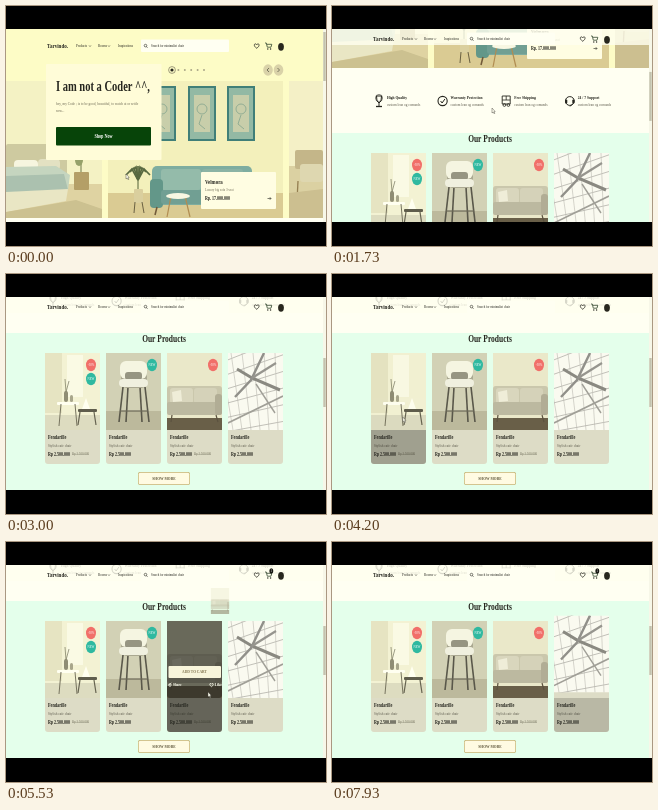
Write an HTML page with a canvas that moves like this. It is 320 px wide and 240 px high and loops after 8000 ms.

```html
<!DOCTYPE html>
<html lang="en">
<head>
<meta charset="utf-8">
<title>Furniture shop</title>
<style>
html, body { margin: 0; width: 100%; height: 100%; overflow: hidden; background: #000; }
canvas { display: block; width: 320px; height: 240px; }
</style>
</head>
<body>
<canvas id="stage"></canvas>
<script>
const LOOP = 8000;
const SQUEEZE = 0.72;
const TOP = 23, BOTTOM = 216;
const INK = '#26261f', PAPER = '#fffff2', GREEN = '#074409';
const TEAL = '#2fb9a0', RED = '#f16f69';

const canvas = document.getElementById('stage');
const ctx = canvas.getContext('2d');
const dpr = window.devicePixelRatio || 1;
canvas.width = 320 * dpr;
canvas.height = 240 * dpr;

const clamp = v => Math.max(0, Math.min(1, v));
const smooth = v => { v = clamp(v); return v * v * (3 - 2 * v); };

// Keys are [time, ...values]; values ease from key to key.
function track(keys, t) {
  if (t <= keys[0][0]) return keys[0].slice(1);
  for (let i = 1; i < keys.length; i++) {
    const a = keys[i - 1], b = keys[i];
    if (t < b[0]) {
      const k = smooth((t - a[0]) / (b[0] - a[0]));
      return a.slice(1).map((v, j) => v + (b[j + 1] - v) * k);
    }
  }
  return keys[keys.length - 1].slice(1);
}

function rect(x, y, w, h, fill, r = 0) {
  ctx.fillStyle = fill;
  ctx.beginPath();
  ctx.roundRect(x, y, w, h, r);
  ctx.fill();
}

function disc(x, y, rx, fill, ry = rx) {
  ctx.fillStyle = fill;
  ctx.beginPath();
  ctx.ellipse(x, y, rx, ry, 0, 0, 7);
  ctx.fill();
}

function ring(x, y, r, color, width = 0.8) {
  ctx.strokeStyle = color;
  ctx.lineWidth = width;
  ctx.beginPath();
  ctx.arc(x, y, r, 0, 7);
  ctx.stroke();
}

function line(points, color, width = 0.8) {
  ctx.strokeStyle = color;
  ctx.lineWidth = width;
  ctx.beginPath();
  points.forEach(([x, y]) => ctx.lineTo(x, y));
  ctx.stroke();
}

function poly(points, fill) {
  ctx.fillStyle = fill;
  ctx.beginPath();
  points.forEach(([x, y]) => ctx.lineTo(x, y));
  ctx.fill();
}

function text(str, x, y, size, { color = INK, bold = false, align = 'left' } = {}) {
  ctx.save();
  ctx.translate(x, y);
  ctx.scale(SQUEEZE, 1);
  ctx.font = `${bold ? 'bold ' : ''}${size}px "Liberation Serif", serif`;
  ctx.textAlign = align;
  ctx.textBaseline = 'middle';
  ctx.fillStyle = color;
  ctx.fillText(str, 0, 0);
  ctx.restore();
}

function faded(alpha, draw) {
  if (alpha <= 0) return;
  ctx.save();
  ctx.globalAlpha *= alpha;
  draw();
  ctx.restore();
}

function clipped(x, y, w, h, draw) {
  ctx.save();
  ctx.beginPath();
  ctx.rect(x, y, w, h);
  ctx.clip();
  draw();
  ctx.restore();
}

function bedSlide() {
  rect(0, 75, 96, 137, '#f4f2c4');
  rect(0, 178, 96, 34, '#dfd3a2');
  rect(0, 138, 61, 34, '#cecaa0', 2);
  rect(8, 154, 24, 10, '#f6f5df', 4);
  rect(32, 153, 22, 11, '#e3e1c2', 4);
  poly([[0, 161], [50, 160], [64, 169], [62, 184], [0, 188]], '#c5d5bf');
  poly([[0, 170], [58, 168], [62, 184], [0, 188]], '#abc1af');
  poly([[0, 186], [62, 183], [60, 195], [0, 206]], '#e9e6c4');
  poly([[0, 206], [70, 194], [96, 203], [96, 212], [0, 212]], '#ccc190');
  rect(68, 166, 15, 18, '#b49f67', 1);
  line([[75, 166], [75, 152]], '#6d7649', 1);
  disc(73, 154, 4, '#95a169', 6);
}

function roomSlide() {
  rect(102, 75, 175, 137, '#f3f0bb');
  rect(102, 187, 175, 25, '#dacb93');
  for (const x of [142, 182, 221]) {
    rect(x, 80, 28, 55, '#407f78');
    rect(x + 2, 82, 24, 51, '#93b9a4');
    rect(x + 6, 89, 16, 37, '#c8ceaa');
    ring(x + 14, 103, 5, '#84a58e');
    line([[x + 14, 109], [x + 11, 118], [x + 17, 123]], '#84a58e');
  }
  rect(146, 160, 100, 39, '#7eada0', 5);
  rect(155, 163, 40, 21, '#94bbaa', 3);
  rect(196, 163, 41, 21, '#8bb3a4', 3);
  rect(144, 173, 13, 29, '#639789', 4);
  rect(155, 184, 84, 14, '#719f93', 3);
  line([[151, 201], [149, 209]], '#715a39', 1.5);
  line([[165, 190], [161, 211]], '#b08c51', 1.2);
  line([[179, 190], [184, 211]], '#b08c51', 1.2);
  disc(172, 190, 12, '#f8f7e2', 3);
  line([[132, 187], [132, 166]], '#526137', 1);
  for (let i = -3; i <= 3; i++) {
    line([[132, 174], [132 + i * 2, 163 - (3 - Math.abs(i))], [132 + i * 4, 160 + Math.abs(i) * 3]], '#586940', 1.7);
  }
  rect(128, 183, 9, 14, '#dacf9e', 1);
  line([[129, 196], [128, 207]], '#4d442c');
  line([[136, 196], [138, 207]], '#4d442c');
}

function sideSlide() {
  rect(283, 75, 34, 137, '#f4f0c6');
  rect(283, 160, 34, 52, '#dbd1a2');
  rect(289, 144, 28, 19, '#c4b689', 2);
  rect(294, 158, 23, 18, '#ded7b0', 3);
  line([[292, 175], [291, 195]], '#947e50', 1.3);
  poly([[283, 187], [317, 183], [317, 212], [283, 212]], '#ccbf90');
}

function hero() {
  rect(0, 0, 320, 214, '#fdfcc6');
  bedSlide();
  roomSlide();
  sideSlide();
  for (let i = 0; i < 6; i++) disc(166 + i * 6.4, 64, i ? 1 : 1.6, i ? '#aaa687' : INK);
  ring(166, 64, 3.4, '#77735c', 0.7);
  for (const [x, d] of [[262, 1], [272.5, -1]]) {
    disc(x, 64, 4.8, '#d9d2a8', 5.8);
    line([[x + d, 62], [x - d, 64], [x + d, 66]], '#605d49');
  }
  rect(40, 58, 115.5, 96, '#fffcd8', 1);
  text('I am not a Coder ^^,', 50, 81, 14.6, { bold: true });
  text('hey, my Code ; is to be good, beautiful, to watch at or settle', 50, 98, 4.8, { color: '#6b6853' });
  text('now...', 50, 105, 4.8, { color: '#6b6853' });
  rect(50, 121, 95, 18.5, GREEN, 1);
  text('Shop Now', 97.5, 130.5, 5.8, { color: '#fff', bold: true, align: 'center' });
  rect(195, 166, 75, 37, '#fffde2', 1);
  text('Velmora', 199, 176, 6.8, { bold: true });
  text('Luxury big sofa 3-seat', 199, 184, 4.4, { color: '#74715b' });
  text('Rp. 17.000.000', 199, 193, 5.5, { bold: true });
  line([[261.5, 192.5], [265, 192.5]], INK, 0.6);
  line([[263.8, 191.2], [265, 192.5], [263.8, 193.8]], INK, 0.6);
}

function featureIcon(kind, x, y) {
  if (kind === 0) {
    line([[x - 2.5, y - 5], [x + 2.5, y - 5], [x + 2, y], [x, y + 2], [x - 2, y], [x - 2.5, y - 5]], INK, 1);
    line([[x, y + 2], [x, y + 5]], INK, 1);
    line([[x - 3, y + 5.5], [x + 3, y + 5.5]], INK, 1.3);
    ring(x, y - 3, 3.5, INK, 0.6);
  } else if (kind === 1) {
    ring(x, y, 4.6, INK, 1.1);
    line([[x - 2, y], [x - 0.5, y + 2], [x + 2.3, y - 2]], INK, 1);
  } else if (kind === 2) {
    line([[x - 4, y - 5], [x + 4, y - 5], [x + 4, y + 3], [x - 4, y + 3], [x - 4, y - 5]], INK, 0.9);
    line([[x - 4, y - 1], [x + 4, y - 1]], INK);
    line([[x, y - 5], [x, y - 1]], INK);
    ring(x - 1.8, y + 4, 1.4, INK);
    ring(x + 2.2, y + 4, 1.4, INK);
  } else {
    ring(x, y, 4.4, INK, 1);
    rect(x - 4.7, y - 1.5, 2.2, 4, INK, 1);
    rect(x + 2.5, y - 1.5, 2.2, 4, INK, 1);
    line([[x + 3, y + 3], [x, y + 5.3]], INK, 1);
  }
}

function features() {
  rect(0, 212, 320, 65, PAPER);
  ['High Quality', 'Warranty Protection', 'Free Shipping', '24 / 7 Support'].forEach((title, i) => {
    const x = 47 + i * 63.6;
    featureIcon(i, x, 245);
    text(title, x + 8, 241.5, 5, { bold: true });
    text('custom lean og comands', x + 8, 248.5, 4.7, { color: '#5b584a' });
  });
}

// Product pictures are drawn in a 55 by 77 box.
const pictures = [
  () => {
    rect(0, 0, 55, 77, '#f3f2d3');
    rect(0, 0, 17, 60, '#e6e4c2');
    rect(22, 2, 16, 42, '#fafae4');
    rect(0, 62, 55, 15, '#dddcc0');
    rect(12, 49, 22, 3, '#fffff0', 1);
    line([[16, 51], [14, 73]], '#77745f', 1);
    line([[30, 51], [32, 73]], '#77745f', 1);
    rect(19, 38, 4, 11, '#8f8d74', 2);
    rect(25, 42, 3, 7, '#a8a68b', 1.5);
    line([[21, 39], [20, 26]], '#85846b');
    line([[21, 39], [24, 28]], '#85846b');
    poly([[41, 45], [45, 56], [37, 56]], '#fffff0');
    rect(33, 56, 19, 3, '#5f5d4c', 1);
    line([[35, 59], [33, 72]], '#65624f', 1.2);
    line([[49, 59], [51, 72]], '#65624f', 1.2);
  },
  () => {
    rect(0, 0, 55, 77, '#d2d1b5');
    rect(0, 58, 55, 19, '#bcb99c');
    for (const [a, b] of [[17, 13], [22, 20], [34, 36], [39, 43]]) line([[a, 34], [b, 69]], '#59574a', 1.6);
    line([[14, 58], [42, 58]], '#6b6858', 1.2);
    rect(15, 10, 26, 25, '#aaa891', 6);
    rect(14, 8, 27, 18, '#f5f5e1', 6);
    rect(19, 19, 17, 8, '#969582', 3);
    rect(13, 26, 29, 8, '#f0f0df', 4);
  },
  () => {
    rect(0, 0, 55, 77, '#eae8c9');
    rect(0, 65, 55, 12, '#695f48');
    rect(0, 33, 55, 22, '#cac7ac', 3);
    rect(3, 35, 23, 16, '#d9d6bd', 3);
    rect(27, 35, 23, 16, '#d5d2b9', 3);
    rect(0, 49, 55, 13, '#bcb9a0', 2);
    rect(48, 41, 7, 21, '#b1ad95', 3);
    poly([[5, 39], [14, 37], [15, 48], [6, 49]], '#efedd8');
    line([[5, 62], [4, 69]], '#5c5340', 1.2);
    line([[49, 62], [51, 69]], '#5c5340', 1.2);
  },
  () => {
    rect(0, 0, 55, 77, '#fafaf0');
    for (let i = 0; i < 7; i++) {
      line([[-8, 10 + i * 14], [63, -18 + i * 17]], '#b3b2aa', 0.8);
      line([[i * 11 - 8, 0], [i * 9 + 5, 77]], '#c4c3ba', 0.7);
    }
    line([[9, 16], [24, 25], [52, 37]], '#8a8981', 3);
    line([[36, 0], [23, 27], [7, 44]], '#91908a', 2.4);
    line([[24, 25], [48, 10]], '#96958e', 2.2);
    line([[0, 70], [55, 43]], '#a09f97', 1.6);
    line([[28, 31], [47, 60]], '#a09f97', 1.4);
  }
];

const cards = [
  { badges: [['-30%', RED], ['NEW', TEAL]], old: true, hover: [4050, 4450] },
  { badges: [['NEW', TEAL]], hover: [4450, 4700] },
  { badges: [['-30%', RED]], old: true, hover: [4700, 6250] },
  { badges: [], hover: [6300, 7740] }
];
cards.forEach((card, i) => { card.x = 39 + i * 61; });

const FADE = 300;
const hoverAmount = ([enter, leave], t) =>
  smooth((t - enter) / FADE) * (1 - smooth((t - leave) / FADE));
const lift = ([, leave], t) => 6 * Math.sin(Math.PI * clamp((t - leave) / FADE));

function picture(i, x, y) {
  clipped(x, y, 55, 77, () => {
    ctx.translate(x, y);
    pictures[i]();
  });
}

const shade = (x, y, h, alpha) => faded(alpha * 0.65, () => rect(x, y, 55, h, '#26261f', [0, 0, 3, 3]));

function cardActions(x, alpha, onButton) {
  faded(alpha, () => {
    rect(x + 1.5, 342, 52.5, 12, onButton ? '#54855a' : '#f8f5db', 1);
    text('ADD TO CART', x + 27.5, 348, 5, {
      color: onButton ? '#a5c68b' : '#827550', bold: true, align: 'center'
    });
    const white = { color: '#fffff0', bold: true };
    ring(x + 3, 361, 1.3, '#fffff0', 0.7);
    line([[x + 2, 361], [x + 4.5, 359]], '#fffff0', 0.7);
    text('Share', x + 6, 361, 4.8, white);
    heart(x + 44.5, 361, 0.55, '#fffff0');
    text('Like', x + 48, 361, 4.8, white);
  });
}

// The shade reaches the body first and the picture in the second half of the fade.
function product(card, i, t, [px, py]) {
  const x = card.x;
  const h = hoverAmount(card.hover, t);
  const full = clamp(2 * h - 1);
  rect(x, 297, 55, 111, '#dddcc6', 3);
  text('Fendarille', x + 3, 381.5, 5.8, { bold: true });
  text('Stylish cafe chair', x + 3, 390, 4.7, { color: '#605e50' });
  text('Rp 2.500.000', x + 3, 398.5, 5.5, { bold: true });
  if (card.old) {
    text('Rp 3.500.000', x + 27, 398.2, 4.4, { color: '#85836f' });
    line([[x + 27, 398.3], [x + 44, 398.3]], '#85836f', 0.4);
  }
  shade(x, 374, 34, h);
  picture(i, x, 297 - lift(card.hover, t));
  faded(1 - clamp(h * 4), () => card.badges.forEach(([label, color], n) => {
    disc(x + 46, 309 + n * 14, 5, color, 6.2);
    text(label, x + 46, 309.2 + n * 14, 4.2, { color: '#fff', align: 'center' });
  }));
  shade(x, 297, 77, full);
  const onButton = px > x && px < x + 55 && py > 124 && py < 136;
  cardActions(x, full, onButton);
}

function products(t, pointer) {
  rect(0, 277, 320, 220, '#e4ffeb');
  text('Our Products', 158, 283.5, 10.4, { bold: true, align: 'center' });
  cards.forEach((card, i) => product(card, i, t, pointer));
  rect(132, 416, 52, 13, '#c4b272', 2);
  rect(132.7, 416.7, 50.6, 11.6, '#fffbe2', 1.5);
  text('SHOW MORE', 158, 422.5, 5, { bold: true, color: '#625a3e', align: 'center' });
}

function heart(x, y, s, color) {
  ctx.strokeStyle = color;
  ctx.lineWidth = 0.8;
  ctx.beginPath();
  ctx.moveTo(x, y + 3 * s);
  ctx.bezierCurveTo(x - 6 * s, y - 1 * s, x - 2 * s, y - 5 * s, x, y - 1.5 * s);
  ctx.bezierCurveTo(x + 2 * s, y - 5 * s, x + 6 * s, y - 1 * s, x, y + 3 * s);
  ctx.stroke();
}

const CLICK = 5270, FLIGHT = 600;

function nav(t, scroll) {
  const y = Math.max(33, 40 - scroll);
  faded(smooth(scroll / 10) * 0.82, () => rect(0, TOP, 320, 16, '#fffff0'));
  rect(135, y - 6.5, 88, 12.5, '#fffff2', 1);
  text('Tarvindo.', 41, y, 7, { bold: true });
  [['Products', 70, 84], ['Rooms', 92, 103], ['Inspirations', 112]].forEach(([label, x, arrow]) => {
    text(label, x, y, 4.4);
    if (arrow) line([[arrow - 1, y - 0.6], [arrow, y + 0.6], [arrow + 1, y - 0.6]], INK, 0.5);
  });
  ring(139.5, y - 0.4, 1.3, INK, 0.6);
  line([[140.5, y + 0.6], [141.5, y + 1.8]], INK, 0.6);
  text('Search for minimalist chair', 145, y, 4.2);
  heart(250.7, y, 0.75, INK);
  line([[259, y - 3], [260.3, y - 3], [261.3, y + 1.2], [265, y + 1.2], [265.8, y - 1.7], [260.8, y - 1.7]], '#33482f');
  disc(261.8, y + 3, 0.7, INK);
  disc(264.6, y + 3, 0.7, INK);
  disc(275, y + 0.8, 2.9, '#28271e', 3.9);
  if (t >= CLICK) {
    disc(265.3, y - 4, 2, '#171711', 2.7);
    text('1', 265.3, y - 3.9, 4.2, { color: '#fff', align: 'center' });
  }
}

function flyingItem(t) {
  const k = (t - CLICK) / FLIGHT;
  if (k < 0 || k > 1) return;
  const [x, y, scale] = track([[0, 188, 118, 0.8], [0.433, 214, 59, 0.34], [1, 263, 32, 0.05]], k);
  faded(0.5 * (1 - k * 0.4), () => {
    ctx.translate(x, y);
    ctx.scale(scale, scale);
    picture(2, -27.5, -38.5);
  });
}

const pointerPath = [
  [0, 120, 168], [800, 158, 110], [1700, 160, 102], [2300, 160, 102],
  [2900, -8, 142], [3600, -8, 142], [4250, 72, 143], [4700, 164, 145],
  [5120, 189, 130], [5300, 189, 130], [5520, 202, 150], [6050, 205, 150],
  [6450, 236, 144], [6850, 248, 131], [7330, 248, 131], [7740, 278, 145],
  [7920, 322, 157]
];
const scrollPath = [[930, 0], [1700, 150], [1760, 150], [2350, 218]];

function cursor([x, y], hand) {
  if (hand) {
    rect(x - 1.2, y - 2, 3.5, 5, '#fff', 1);
    line([[x, y], [x, y - 3]], '#fff', 1.3);
    return;
  }
  const shape = [[x, y], [x, y + 5], [x + 1.2, y + 4], [x + 2, y + 5.7], [x + 2.8, y + 5.3], [x + 2, y + 3.7], [x + 3.2, y + 3.5], [x, y]];
  poly(shape, '#fffff0');
  line(shape, '#44423a', 0.45);
}

function draw(t) {
  const [scroll] = track(scrollPath, t);
  const pointer = track(pointerPath, t);
  ctx.setTransform(dpr, 0, 0, dpr, 0, 0);
  rect(0, 0, 320, 240, '#000');
  clipped(0, TOP, 320, BOTTOM - TOP, () => {
    ctx.save();
    ctx.translate(0, -scroll);
    hero();
    features();
    products(t, pointer);
    ctx.restore();
    nav(t, scroll);
    flyingItem(t);
    rect(317, TOP, 3, BOTTOM - TOP, '#f7f7e8');
    rect(317.3, 26 + scroll * 0.266, 2.4, 49, '#c3c2ae');
    cursor(pointer, t > 6750 && t < 7400);
  });
}

function frame() {
  draw(performance.now() % LOOP);
  requestAnimationFrame(frame);
}
frame();
</script>
</body>
</html>
```
